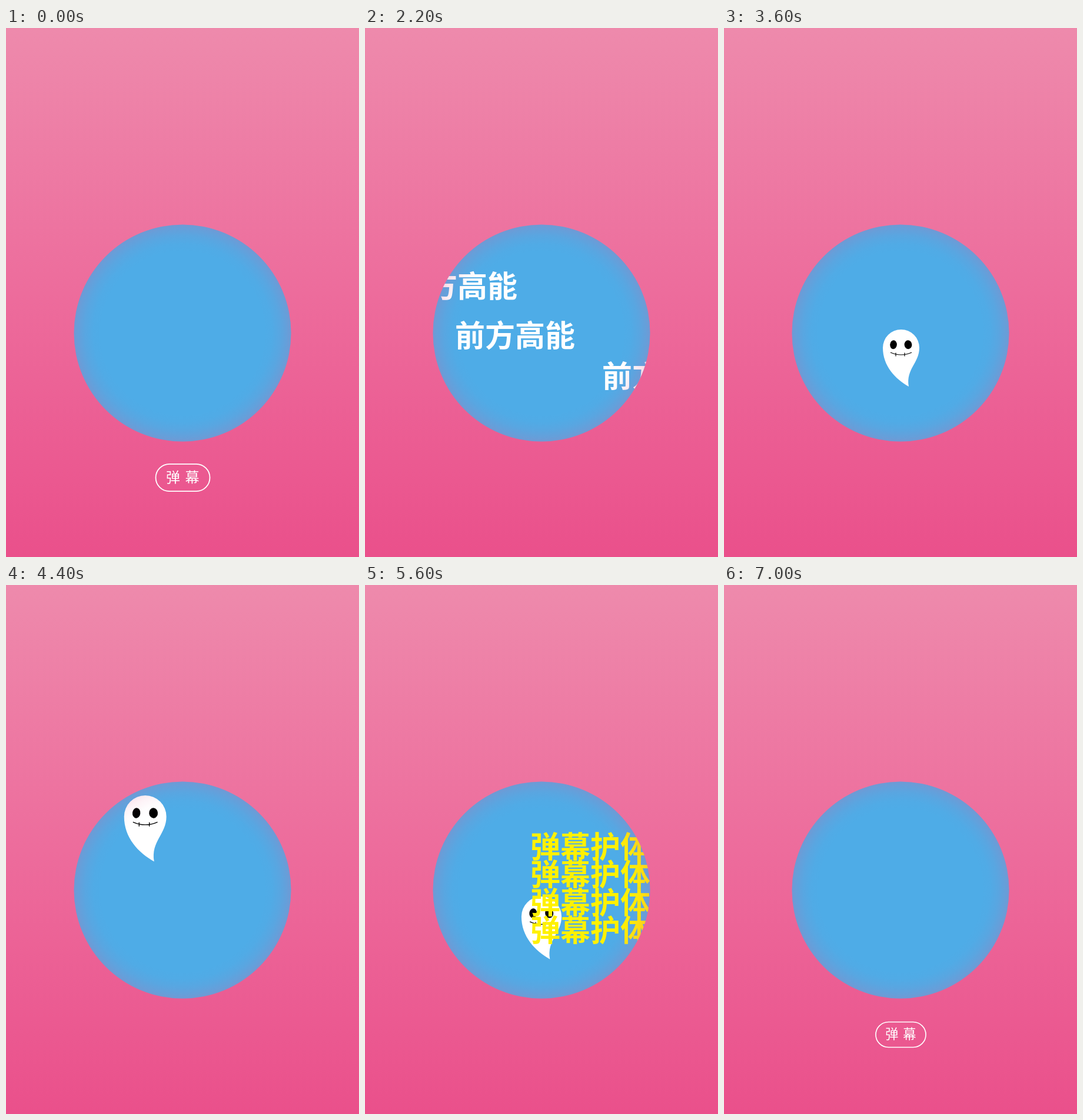
Write an HTML page with a canvas that moves like this. It is 600x900 px and loops after 7.1 s.

```html
<!DOCTYPE html>
<html lang="zh-CN">
<head>
<meta charset="utf-8">
<style>
  html, body { margin: 0; width: 100%; height: 100%; overflow: hidden; background: #ec6f9e; }
  canvas { display: block; width: 600px; height: 900px; }
</style>
</head>
<body>
<canvas id="stage" width="600" height="900"></canvas>
<script>
const ctx = document.getElementById('stage').getContext('2d');
const LOOP = 7100, STEP = 100;
const FONT = '"Noto Sans CJK SC", "Noto Sans CJK", "Noto Sans CJK JP", sans-serif';
const DISC = { x: 300, y: 519, r: 184.5 };

// Comments: left edge at time t0, speed in px/ms
const COMMENTS = [
  { y: 457.5, x: 316, t0: 1400, speed: 0.325 },
  { y: 541.5, x: 154, t0: 2200, speed: 0.415 },
  { y: 611, x: 404, t0: 2200, speed: 0.415 }
];
// time, centre x, top y, scale
const GHOST_PATH = [
  [3200, 510, 415, 1], [3400, 415, 445, 1], [3600, 301, 513, 1],
  [3800, 215, 534, 1], [4000, 147, 500, 1], [4200, 165, 430, 1.05],
  [4450, 255, 353, 1.2], [4700, 335, 435, 1.5], [4900, 318, 488, 1.65],
  [5100, 268, 504, 1.75], [5600, 300, 530, 1.1], [6200, 340.5, 562, 0.45],
  [6450, 345, 570, 0.1]
];
// time, left x, top y
const SHIELD_PATH = [
  [4900, 129, 470], [5100, 167, 495], [5350, 235, 500], [5600, 282, 421],
  [5750, 225, 384], [5900, 134, 430], [6050, 180, 498], [6200, 263, 430],
  [6450, 279, 446]
];

const clamp = v => Math.max(0, Math.min(1, v));

// Cubic interpolation through timed points; null outside their span
function along(path, t) {
  const last = path.length - 1;
  if (t < path[0][0] || t > path[last][0]) return null;
  let i = 0;
  while (i < last - 1 && t >= path[i + 1][0]) i++;
  const a = path[i], b = path[i + 1];
  const before = path[Math.max(0, i - 1)], after = path[Math.min(last, i + 2)];
  const span = b[0] - a[0], u = (t - a[0]) / span;
  return a.slice(1).map((from, k) => {
    const to = b[k + 1];
    const m0 = (to - before[k + 1]) / (b[0] - before[0]) * span;
    const m1 = (after[k + 1] - from) / (after[0] - a[0]) * span;
    return from + u * (m0 + u * (3 * (to - from) - 2 * m0 - m1 + u * (2 * (from - to) + m0 + m1)));
  });
}

function linear(y0, y1, stops) {
  const g = ctx.createLinearGradient(0, y0, 0, y1);
  stops.forEach(([at, color]) => g.addColorStop(at, color));
  return g;
}
const backdrop = linear(0, 900, [[0, '#ee8aac'], [0.5, '#ed6c9c'], [1, '#ea508b']]);
const rim = ctx.createRadialGradient(DISC.x, DISC.y, 138, DISC.x, DISC.y, DISC.r);
[[0, 0], [0.3, 0.015], [0.6, 0.07], [0.85, 0.15], [1, 0.21]].forEach(([at, alpha]) =>
  rim.addColorStop(at, `rgba(235,85,143,${alpha})`));

function discPath() {
  ctx.beginPath();
  ctx.arc(DISC.x, DISC.y, DISC.r, 0, Math.PI * 2);
}

function heavyText(text, x, y, color) {
  ctx.font = `900 51px ${FONT}`;
  ctx.textAlign = 'left';
  ctx.fillStyle = color;
  ctx.fillText(text, x - 1, y);
}

function drawGhost([x, y, scale]) {
  ctx.save();
  ctx.translate(x, y);
  ctx.scale(scale, scale);
  ctx.fillStyle = '#fff';
  ctx.beginPath();
  ctx.arc(0, 31, 31, Math.PI, 0);
  ctx.bezierCurveTo(31, 57, 8, 67, 13, 97);
  ctx.bezierCurveTo(-10, 84, -31, 62, -31, 31);
  ctx.fill();
  ctx.fillStyle = ctx.strokeStyle = '#000';
  for (const [ex, rx, tilt] of [[-13, 5.8, 0.1], [12, 6.4, -0.1]]) {
    ctx.beginPath();
    ctx.ellipse(ex, 25.8, rx, 7.5, tilt, 0, Math.PI * 2);
    ctx.fill();
  }
  ctx.lineWidth = 1.2;
  ctx.beginPath();
  ctx.moveTo(-18, 39);
  ctx.quadraticCurveTo(0, 47, 18, 39);
  for (const sx of [-9, 6]) {
    ctx.moveTo(sx, 39.5);
    ctx.lineTo(sx, 45.5);
  }
  ctx.stroke();
  ctx.restore();
}

function drawButton(t) {
  let scale = 1, drop = 0;
  if (t >= 6600) {
    scale = 1 - Math.pow(1 - (t - 6600) / 500, 1.61);
  } else if (t < 1000) {
    const p = clamp((t - 500) / 500);
    scale = 1 + 0.42 * p;
    drop = 190 * p * p;
  } else return;
  if (scale <= 0) return;
  ctx.save();
  ctx.translate(300.5, 765 + drop);
  ctx.scale(scale, scale);
  ctx.strokeStyle = ctx.fillStyle = '#fff';
  ctx.lineWidth = 1.8;
  ctx.beginPath();
  ctx.roundRect(-46, -23.2, 92, 46.4, 23.2);
  ctx.stroke();
  ctx.font = `300 24px ${FONT}`;
  ctx.textAlign = 'center';
  ctx.fillText('弹', -16.5, 7.8);
  ctx.fillText('幕', 16, 7.8);
  ctx.restore();
}

function draw(t) {
  ctx.fillStyle = backdrop;
  ctx.fillRect(0, 0, 600, 900);

  ctx.save();
  discPath();
  ctx.fillStyle = '#4eace7';
  ctx.fill();
  ctx.clip();
  for (const c of COMMENTS) {
    heavyText('前方高能', c.x - (t - c.t0) * c.speed, c.y, '#fff');
  }
  const ghost = along(GHOST_PATH, t);
  if (ghost) drawGhost(ghost);
  const shield = along(SHIELD_PATH, t);
  if (shield) {
    for (let row = 0; row < 4; row++) {
      heavyText('弹幕护体', shield[0], shield[1] + 43 + row * 47.4, '#fff100');
    }
  }
  ctx.restore();

  discPath();
  ctx.fillStyle = rim;
  ctx.fill();
  drawButton(t);
}

const start = performance.now();
function tick() {
  const t = (performance.now() - start) % LOOP;
  draw(Math.floor(t / STEP) * STEP);
  requestAnimationFrame(tick);
}
tick();
</script>
</body>
</html>
```
